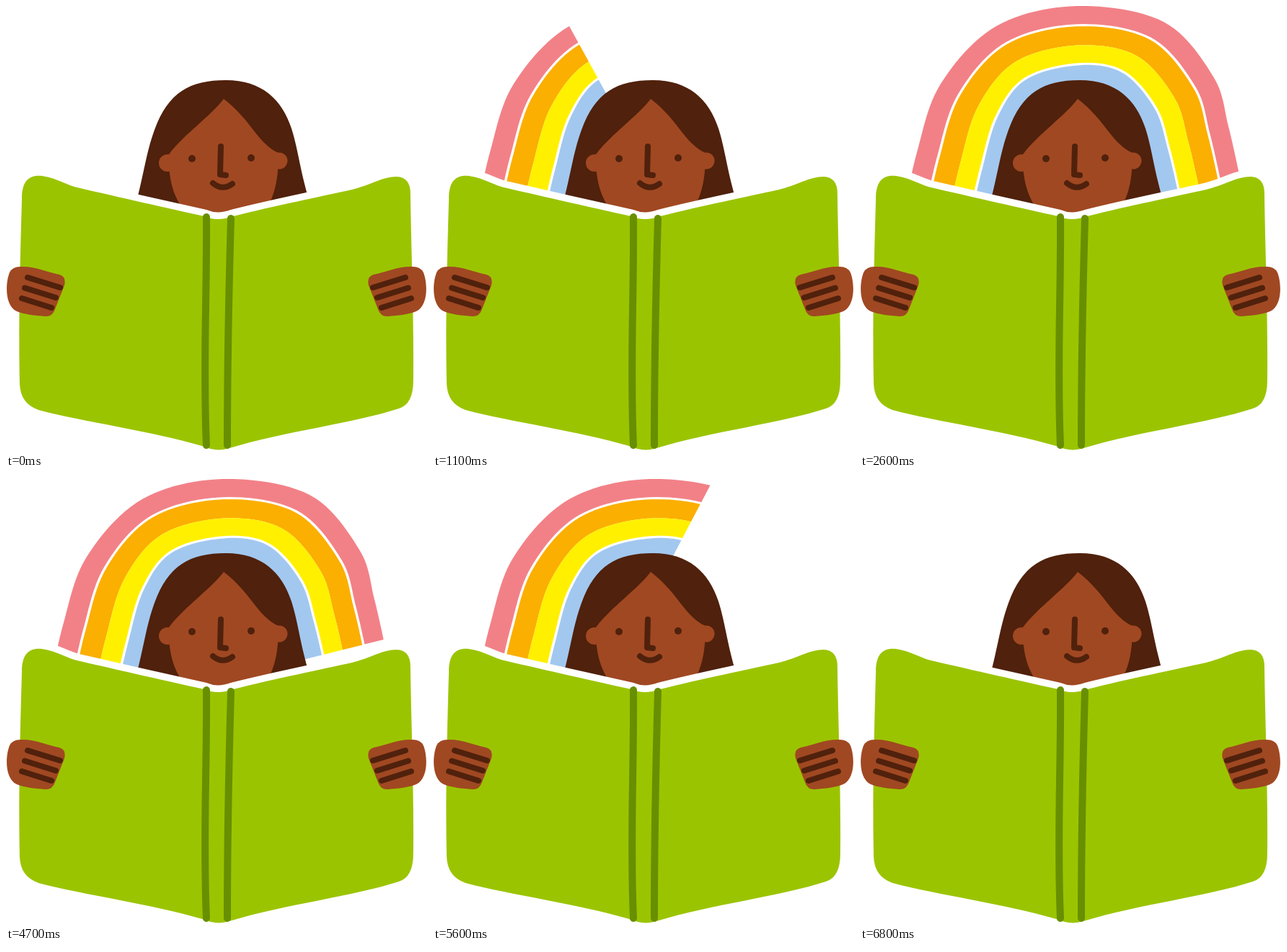
Write an HTML page with a canvas that moves like this. It is 584x618 px and loops after 6900 ms.

```html
<!DOCTYPE html>
<html lang="en">
<head>
<meta charset="utf-8">
<title>Reading under a rainbow</title>
<style>
html, body { margin: 0; width: 100%; height: 100%; overflow: hidden; background: #fff; }
canvas { display: block; }
</style>
</head>
<body>
<canvas id="stage" width="584" height="618"></canvas>
<script>
const ctx = document.getElementById('stage').getContext('2d');
const SKIN = '#a04822', HAIR = '#50210c', GREEN = '#9bc400', SPINE = '#688f00';
const LOOP = 6900, TICK = 100, LAST = 22;

const hair = new Path2D('M180 290V275C191 235 194 205 206 172C225 120 255 103 305 103C355 103 383 130 396 170C406 202 408 230 422 275V290Z');
const face = new Path2D('M302 129C285 152 247 178 226 206C225 240 232 268 252 290H355C370 270 378 250 378 204C350 192 340 158 302 129Z');
const nose = new Path2D('M298 195L297 234L305 235');
const mouth = new Path2D('M287 246Q300 257 314 247');
const book = new Path2D('M22 268C22 244 31 234 50 236C72 239 85 250 103 253C150 264 230 282 275 292Q293 300 315 292C370 278 440 264 480 255C505 249 522 237 542 237Q561 238 561 260C562 340 566 430 565 520Q565 553 545 559C480 580 390 590 310 614Q292 620 272 611C200 590 110 578 45 561Q20 552 19 525C17 440 20 340 22 268Z');
const spines = new Path2D('M278 293C279 400 273 500 278 610M312 295C309 400 307 500 307 610');
const palm = new Path2D('M20 362C40 361 55 369 74 373Q84 376 81 388L68 421Q65 431 55 431C40 430 25 428 15 424C-2 416 -1 385 5 370Q9 362 20 362Z');

// Spokes across the rainbow, one every three steps: outer x, y, inner x, y.
const SPACING = 3, FIRST = -2;
const spokes = [
  [60, 292, 172, 318],
  [79, 203, 192, 233],
  [112, 108, 211, 165],
  [189, 28, 240, 121],
  [301, 0, 302, 103],
  [421, 22, 349, 110],
  [490, 98, 388, 153],
  [511, 167, 406, 207],
  [528, 243, 420, 265]
];

// Each band runs between two fractions of a spoke; blue continues behind the hair.
const bands = [
  ['#f28187', 0, .245],
  ['#fbaf00', .275, .53],
  ['#fff000', .53, .77],
  ['#a2c8ef', .8, 1.25]
];

function fill(path, color) {
  ctx.fillStyle = color;
  ctx.fill(path);
}

function line(path, color, width) {
  ctx.strokeStyle = color;
  ctx.lineWidth = width;
  ctx.stroke(path);
}

function dot(x, y, radius, color) {
  const path = new Path2D();
  path.arc(x, y, radius, 0, Math.PI * 2);
  fill(path, color);
}

// Catmull-Rom interpolation between neighbouring spokes.
function spokeAt(step) {
  const position = (step - FIRST) / SPACING;
  const i = Math.min(Math.floor(position), spokes.length - 2), t = position - i;
  const [a, b, c, d] = [-1, 0, 1, 2].map(k =>
    spokes[Math.max(0, Math.min(spokes.length - 1, i + k))]);
  return b.map((v, j) => v + t / 2 * (c[j] - a[j]
    + t * (2 * a[j] - 5 * v + 4 * c[j] - d[j]
    + t * (3 * (v - c[j]) + d[j] - a[j]))));
}

function drawRainbow(step) {
  if (!step) return;
  const swept = [];
  for (let s = FIRST; s <= step; s += .25) swept.push(spokeAt(s));
  const edge = fraction => swept.map(([ox, oy, ix, iy]) =>
    [ox + (ix - ox) * fraction, oy + (iy - oy) * fraction]);
  for (const [color, from, to] of bands) {
    const path = new Path2D();
    [...edge(from), ...edge(to).reverse()].forEach(p => path.lineTo(...p));
    fill(path, color);
  }
}

function drawHead() {
  fill(hair, HAIR);
  fill(face, SKIN);
  dot(224, 218, 12, SKIN);
  dot(379, 215, 11.5, SKIN);
  dot(258, 212, 5, HAIR);
  dot(340, 211, 5, HAIR);
  line(nose, HAIR, 8);
  line(mouth, HAIR, 8);
}

function drawHand() {
  fill(palm, SKIN);
  const fingers = new Path2D();
  for (let i = 0; i < 3; i++) {
    fingers.moveTo(30 - 4 * i, 377 + 14.5 * i);
    fingers.lineTo(75 - 6 * i, 391 + 14 * i);
  }
  line(fingers, HAIR, 8);
}

function draw(time) {
  const tick = Math.floor(time % LOOP / TICK);
  const step = Math.max(0, Math.min(LAST, tick - 4, 68 - tick));
  ctx.fillStyle = '#fff';
  ctx.fillRect(0, 0, 584, 618);
  ctx.lineCap = ctx.lineJoin = 'round';
  drawRainbow(step);
  drawHead();
  line(book, '#fff', 19);
  fill(book, GREEN);
  line(spines, SPINE, 10);
  drawHand();
  ctx.save();
  ctx.translate(584, 0);
  ctx.scale(-1, 1);
  drawHand();
  ctx.restore();
}

const start = performance.now();
function frame() {
  draw(performance.now() - start);
  requestAnimationFrame(frame);
}
frame();
</script>
</body>
</html>
```
